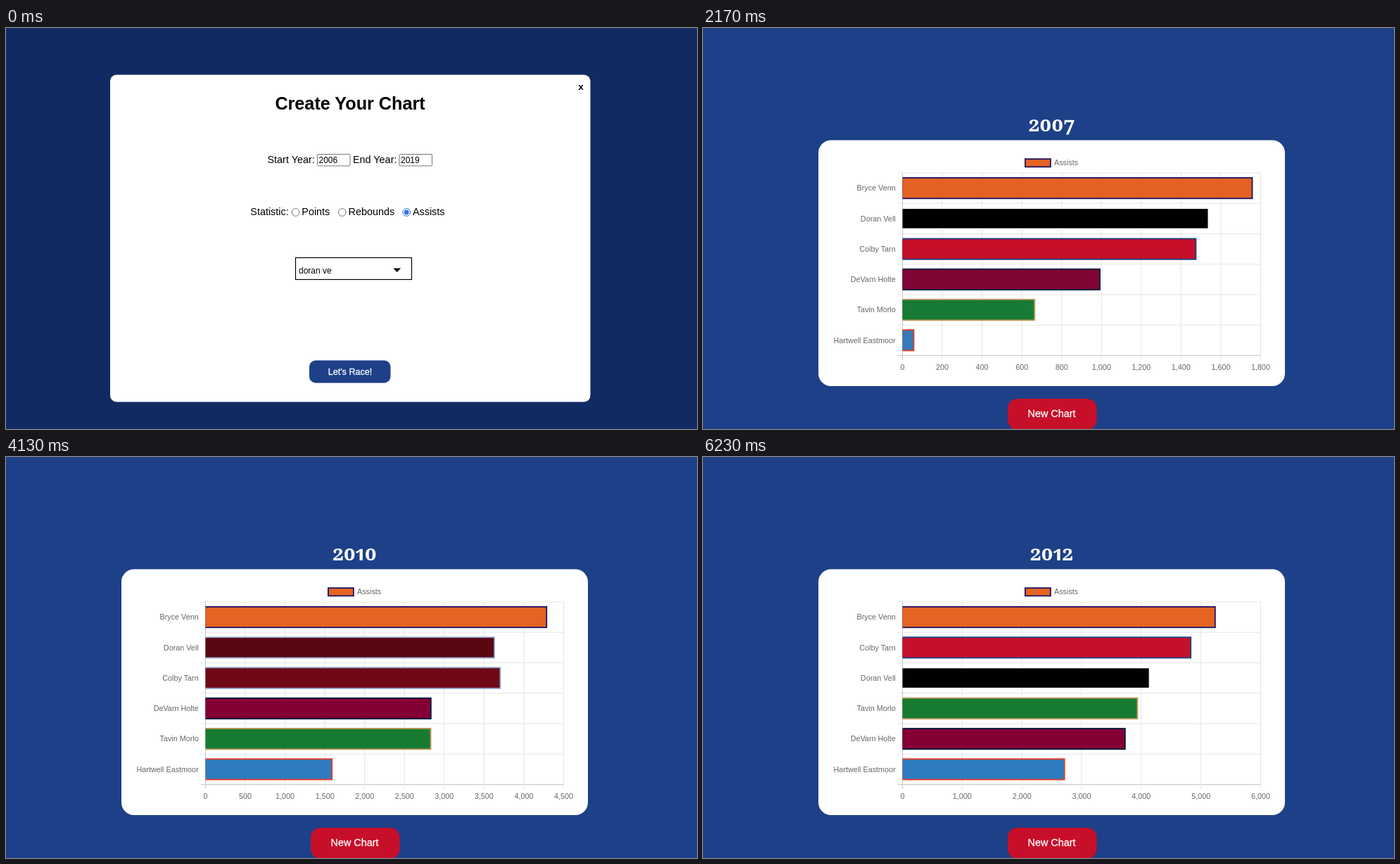
Animation, 982 px wide and 570 px high, one loop 6.3 s. Source, as an HTML page:

```html
<!DOCTYPE html>
<html lang="en">
<head>
<meta charset="utf-8">
<title>Chart race</title>
<style>
  html, body { margin: 0; width: 100%; height: 100%; overflow: hidden; background: #1d4088; }
  svg { display: block; font-family: "Liberation Sans", Arial, sans-serif; }
  .year { font: 600 29px "Noto Serif", serif; font-variant-numeric: oldstyle-nums proportional-nums; }
  .button { stroke: #fff; stroke-width: .3; }
</style>
</head>
<body>
<svg id="stage" width="982" height="570" viewBox="0 0 982 570"></svg>
<script>
const LOOP = 6300, STEP = 70, DURATION = 1000, FIRST_YEAR = 2006;
const LEFT = 283.5, TOP = 206, ROW = 43.25, BOTTOM = TOP + 6 * ROW;
const BAR = ROW * 0.72, BORDER = 1.8, GRID = '#e5e5e5', AXIS = '#c4c4c4';
const starts = [800.5, 1598, 2395, 3170, 3947, 4752, 5540];

// Assists per season, with fill and border colours.
const players = [
  ['Colby Tarn', [200, 15, 41], [29, 66, 138], [571, 925, 861, 482, 782, 543, 678]],
  ['Doran Vell', [0, 0, 0], [255, 255, 255], [737, 806, 702, 727, 656, 262, 251]],
  ['DeVarn Holte', [132, 0, 52], [4, 30, 66], [470, 539, 587, 651, 554, 387, 551]],
  ['Tavin Morlo', [22, 123, 49], [186, 150, 83], [297, 393, 659, 794, 760, 620, 420]],
  ['Hartwell Eastmoor', [47, 123, 191], [239, 59, 36], [0, 0, 435, 652, 670, 362, 607]],
  ['Bryce Venn', [229, 100, 35], [29, 17, 96], [884, 898, 714, 892, 855, 664, 335]],
].map(([name, fill, border, seasons]) => {
  let sum = 0;
  return { name, fill, border, totals: seasons.map(n => sum += n) };
});

const mix = (a, b, p) => a + (b - a) * p;
const color = (a, b = a, p = 0) => `rgb(${a.map((v, i) => Math.round(mix(v, b[i], p)))})`;
const easeOutQuart = x => 1 - (1 - x) ** 4;

const rect = (x, y, w, h, fill, extra = '') =>
  `<rect x="${x}" y="${y}" width="${Math.max(0, w)}" height="${h}" fill="${fill}" ${extra}/>`;
const text = (x, y, size, content, extra = '') =>
  `<text x="${x}" y="${y}" font-size="${size}" ${extra}>${content}</text>`;
const line = (x1, y1, x2, y2, stroke) =>
  `<path d="M${x1} ${y1}L${x2} ${y2}" stroke="${stroke}"/>`;
const middle = 'text-anchor="middle"', white = 'fill="#fff"', gray = 'fill="#666"';

// One chart per year; rows are ranked by the totals of the year before.
const charts = starts.map((start, k) => {
  const order = k ? [...players].sort((a, b) => b.totals[k - 1] - a.totals[k - 1]) : players;
  const top = Math.max(...players.map(p => p.totals[k]));
  const power = 10 ** Math.floor(Math.log10(top / 10));
  const step = [1, 2, 5, 10].find(n => n * power >= top / 10) * power;
  const max = Math.ceil(top / step) * step;
  const right = k ? 792.5 : 797;
  const toWidth = value => value / max * (right - LEFT);
  return { start, order, step, max, right, toWidth, widths: order.map(p => toWidth(p.totals[k])) };
});

function drawForm(t) {
  const field = (x, value) =>
    rect(x, 179.5, 46.5, 16.5, '#fff', 'stroke="#767676" rx="1.5"') + text(x + 2, 192, 12, value);
  const radio = (x, label, checked) =>
    `<circle cx="${x}" cy="262" r="5.4" fill="#fff" stroke="${checked ? '#2f74e0' : '#767676'}"/>` +
    (checked ? `<circle cx="${x}" cy="262" r="3.4" fill="#2f74e0"/>` : '') +
    text(x + 8.7, 266, 14.4, label);
  const typed = 'doran vell'.slice(0, 8 + Math.min(2, Math.floor(t / 140)));
  return rect(0, 0, 982, 570, '#112b62') +
    rect(148, 66.5, 682.5, 465, '#fff', 'rx="9"') +
    text(817, 88, 13.5, 'x', middle + ' font-weight="bold"') +
    text(489, 116, 25.2, 'Create Your Chart', middle + ' font-weight="bold"') +
    text(371.5, 192, 14.4, 'Start Year:') + field(442.5, 2006) +
    text(493, 192, 14.4, 'End Year:') + field(559, 2019) +
    text(347.3, 266, 14.4, 'Statistic:') +
    radio(411.6, 'Points') + radio(477.8, 'Rebounds') + radio(569.2, 'Assists', true) +
    rect(411.5, 326.5, 165, 31, '#fff', 'stroke="#000" stroke-width="1.2"') +
    text(416, 349, 12, typed) +
    '<path d="M550.3 341.5h10.8l-5.4 5.4z"/>' +
    rect(431, 472.5, 115.5, 32, '#1d4088', 'rx="9"') +
    text(489, 493, 12.6, "Let's Race!", `${middle} ${white} class="button"`);
}

function drawAxes({ order, step, max, right, toWidth }) {
  let out = '';
  for (let i = 0; i <= 6; i++) {
    const y = TOP + i * ROW;
    out += line(277, y, right, y, i < 6 ? GRID : AXIS);
    if (i < 6) out += text(273.7, y + 25.3, 10.8, order[i].name, gray + ' text-anchor="end"');
  }
  for (let value = 0; value <= max; value += step) {
    const x = LEFT + toWidth(value);
    out += line(x, TOP, x, BOTTOM + 6, value ? GRID : AXIS) +
      text(x, 486, 10.8, value.toLocaleString('en-US'), `${middle} ${gray}`);
  }
  return out;
}

function drawBars(k, p) {
  const now = charts[k], before = charts[k - 1];
  return now.order.map((player, i) => {
    const old = before ? before.order[i] : player;
    const width = mix(before ? before.widths[i] : 0, now.widths[i], p);
    if (width < 0.5) return '';
    const y = TOP + i * ROW + (ROW - BAR) / 2;
    return rect(LEFT, y, width, BAR, color(old.border, player.border, p)) +
      rect(LEFT, y + BORDER, width - BORDER, BAR - 2 * BORDER, color(old.fill, player.fill, p));
  }).join('');
}

function drawChart(t) {
  const k = starts.filter(s => s <= t).length - 1;
  const chart = charts[k], leader = chart.order[0];
  const p = easeOutQuart(Math.min(1, (t - chart.start) / DURATION));
  return rect(0, 0, 982, 570, '#1d4088') +
    text(495.5, 147, 29, FIRST_YEAR + k, `${middle} ${white} class="year"`) +
    rect(164, 159.5, 663, 349.5, '#fff', 'rx="18"') +
    rect(457.9, 186.2, 36, 11.2, color(leader.fill),
      `stroke="${color(leader.border)}" stroke-width="${BORDER}"`) +
    text(499, 195.3, 10.8, 'Assists', gray) +
    drawAxes(chart) + drawBars(k, p) +
    rect(433, 527, 126.5, 44, '#c80f29', 'rx="14"') +
    text(495.5, 553, 14.4, 'New Chart', `${middle} ${white} class="button"`);
}

const stage = document.getElementById('stage');
let shown = -1;
function frame(now) {
  const t = Math.floor(now % LOOP / STEP) * STEP;
  if (t !== shown) {
    stage.innerHTML = t < starts[0] ? drawForm(t) : drawChart(t);
    shown = t;
  }
  requestAnimationFrame(frame);
}
requestAnimationFrame(frame);
</script>
</body>
</html>
```
